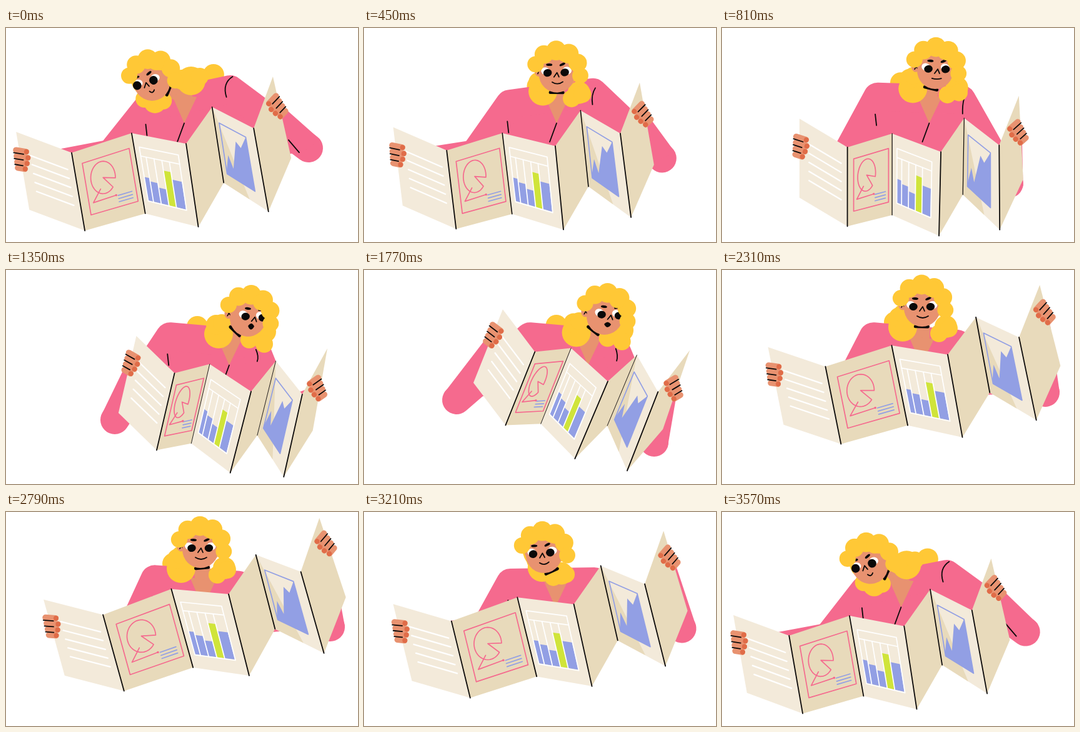
An HTML page with a canvas for the animation above (3.6 s loop, 563 by 344 pixels).

```html
<!DOCTYPE html>
<html lang="en">
<head>
<meta charset="utf-8">
<title>Reading a folded report</title>
<style>
html, body { margin: 0; width: 563px; height: 344px; overflow: hidden; background: #fff; }
canvas { display: block; }
</style>
</head>
<body>
<canvas id="stage" width="563" height="344"></canvas>
<script>
const ctx = document.getElementById('stage').getContext('2d');
const LOOP = 3600, TAU = Math.PI * 2;
const PINK = '#f56a8e', SKIN = '#e89270', NAIL = '#e06c48', HAIR = '#ffc836', INK = '#0b0909',
  LIGHT = '#f3eada', DARK = '#e8dabb', BLUE = '#929fe4', GREEN = '#d0e43a', WHITE = '#fff';

// map x, y, tilt, openness | chest x, lean | left elbow, right elbow | face x, y, turn
const poses = [
  [288,186,-9.6,.82, 293,-12, 168,202, 484,193, 233,87,-1],
  [350,199,0,.34, 316,2, 198,205, 459,250, 341,68,.3],
  [392,195,13,0, 329,5, 174,241, 440,230, 387,77,1],
  [390,179,21.7,0, 332,5, 148,209, 464,277, 385,74,.9],
  [361,136,-11.3,1, 309,5, 205,180, 517,197, 320,61,0],
  [356,132,-15.4,1.1, 305,4, 203,185, 519,185, 311,60,0]];

// time, pose progress, head progress where the head leads
const keys = [[0,0], [540,.37,.8], [810,1], [1080,1.8], [1350,2], [1620,2.95], [1770,3],
  [2160,3.82], [2310,4], [2700,4.97], [2790,5], [3240,5.33], [3570,5.95]];

// panel width and rise when closed, and what opening adds
const panels = [[73,44.5,11,4], [51.5,-27,59,14.5], [74.4,28,10.6,4],
  [27.5,-56.5,28.5,6.5], [53.3,42.6,8,2.5], [22.5,-81,26.5,5]];
const foldLength = [127, 127, 131, 135, 123, 136, 134];
const foldSlip = [0, 0, 0, -3, -2, 1, 7];

// lock radius and its place when the face looks left, ahead and right
const locks = [
  [17, [99,-12], [-44,23], [-81,14]],
  [23, [63,-2], [-31,31], [-47,26]],
  [16, [48,-4], [-37,15], [-51,11]],
  [14, [77,-9], [-32,9], [-42,8]],
  [18, [5,32], [38,30], [27,22]],
  [14, [-12,27], [27,41], [2,35]],
  [14, [18,30], [43,33], [26,42]]];

const clamp = (v, lo, hi) => Math.min(hi, Math.max(lo, v));
const lerp = (p, q, s) => p.map((v, i) => v + (q[i] - v) * s);
const add = ([x, y], dx, dy) => [x + dx, y + dy];
const polar = (r, degrees) => [r * Math.cos(degrees * TAU / 360), r * Math.sin(degrees * TAU / 360)];

// Smooth monotone curve through the keys; column 2 is the head
function progress(t, column) {
  const n = keys.length;
  const key = i => {
    const turn = Math.floor(i / n), k = keys[i - turn * n];
    return [k[0] + turn * LOOP, (k[column] ?? k[1]) + turn * 6];
  };
  let i = n - 1;
  while (keys[i][0] > t) i--;
  const [a, b, c, d] = [i - 1, i, i + 1, i + 2].map(key);
  const rate = (p, q) => (q[1] - p[1]) / (q[0] - p[0]);
  const slope = (p, q) => 2 * p * q / (p + q);
  const h = c[0] - b[0], s = (t - b[0]) / h, mid = rate(b, c);
  const m0 = slope(rate(a, b), mid) * h, m1 = slope(mid, rate(c, d)) * h;
  return b[1] + (c[1] - b[1]) * s * s * (3 - 2 * s) + s * (1 - s) * ((1 - s) * m0 - s * m1);
}
function poseAt(p) {
  const i = Math.floor(p);
  return lerp(poses[i % 6], poses[(i + 1) % 6], p - i);
}

function trace(points) {
  ctx.beginPath();
  points.forEach(p => ctx.lineTo(...p));
}
function fill(points, color) {
  trace(points);
  ctx.fillStyle = color;
  ctx.fill();
}
function line(points, color = INK, width = 1.8, closed = false) {
  trace(points);
  if (closed) ctx.closePath();
  ctx.strokeStyle = color;
  ctx.lineWidth = width;
  ctx.stroke();
}
function oval(x, y, rx, ry, color, angle = 0) {
  ctx.beginPath();
  ctx.ellipse(x, y, rx, ry, angle, 0, TAU);
  ctx.fillStyle = color;
  ctx.fill();
}
const ball = ([x, y], r, color) => oval(x, y, r, r, color);

function place([x, y], degrees, flip, draw) {
  ctx.save();
  ctx.translate(x, y);
  ctx.rotate(degrees * TAU / 360);
  ctx.scale(flip, 1);
  draw();
  ctx.restore();
}

// Fold ends and hand spots: a zigzag hung from its fourth fold, then turned
function layoutMap(x, y, tilt, open) {
  const zigzag = [[0, 0]];
  panels.forEach(([w, h, dw, dh], i) => zigzag.push(add(zigzag[i], w + dw * open, h + dh * open)));
  const ux = polar(1, tilt), uy = polar(1, tilt + 90), [ox, oy] = zigzag[3];
  const turn = ([px, py]) => [0, 1].map(k => [x, y][k] + (px - ox) * ux[k] + (py - oy) * uy[k]);
  return {
    tilt, open,
    top: zigzag.map(turn),
    bottom: zigzag.map((p, i) => turn(add(p, foldSlip[i], foldLength[i]))),
    handL: turn([0, 45]),
    handR: turn(add(zigzag[6], 0, 66 - 21 * open))
  };
}

function sleeve(elbow, hand) {
  const dx = hand[0] - elbow[0], dy = hand[1] - elbow[1], len = Math.hypot(dx, dy);
  const side = (p, r) => add(p, -dy / len * r, dx / len * r);
  fill([side(elbow, 23), side(hand, 5), side(hand, -5), side(elbow, -23)], PINK);
}

function drawBody(map, elbowL, elbowR, shoulderL, shoulderR, turn) {
  const waist = i => lerp(map.top[i], map.bottom[i], .5);
  fill([elbowL, shoulderL, shoulderR, elbowR, waist(3), waist(2)], PINK);
  line([elbowL, shoulderL, shoulderR, elbowR], PINK, 46);
  sleeve(elbowL, map.handL);
  sleeve(elbowR, map.handR);
  line([add(elbowR, -32, -13), add(elbowR, -15, 7)]);
  line([add(shoulderL, -4, 28), add(shoulderL, -2, 46)]);
  ctx.beginPath();
  ctx.moveTo(...add(shoulderR, 4, -6 + 15 * turn));
  ctx.quadraticCurveTo(...add(shoulderR, -2 + 11 * turn, 5 + 15 * turn), ...add(shoulderR, 6 * turn, 20 + 8 * turn));
  ctx.stroke();
}

function drawFace(turn) {
  const left = Math.max(0, -turn), right = Math.max(0, turn);
  [[-31 + 26 * left, 1], [31 - 26 * right, -1]].forEach(([x, flip]) => place([x, -5], 0, flip, () => {
    oval(0, 0, 7, 8.5, SKIN);
    line([[-3, -4], [3, 3]], INK, 1.6);
    line([[0, 0], [-2, 4]], INK, 1.6);
  }));
  oval(0, 0, 29, 30, SKIN);

  ctx.translate(10 * turn, -2);
  const glance = [-4 + 7 * left, 4 - 8 * Math.min(1, 2 * right)];
  [-14, 13.5].forEach((x, i) => {
    oval(x + glance[i], -3, 7, 6, WHITE, .3);
    oval(x, 0, 6.8, 6 + left, INK, -.2);
  });
  oval(-11, -13, 5, 2, INK, .05);
  oval(10, -13, 5, 2, INK, -.4);
  line([[-4, 7], [1, 0], [4, 7]]);

  const mx = 1 - 5 * turn, my = 15, w = 9 - 5 * Math.abs(turn);
  const curve = clamp(6 - 13 * turn, 1, 6), open = 13 * Math.max(0, turn - .4);
  ctx.beginPath();
  ctx.moveTo(mx - w, my);
  ctx.quadraticCurveTo(mx, my + curve - open, mx + w, my);
  ctx.quadraticCurveTo(mx, my + curve + open, mx - w, my);
  ctx.fillStyle = INK;
  if (open > 0) ctx.fill();
  ctx.stroke();
}

function drawCurls(face, turn) {
  for (let i = 0; i < 6; i++)
    ball(add(face, ...polar(37.5, -155 + 32 * i + 9 * turn)), 12.5 + 3.5 * Math.sin((i + .3) / 5.5 * Math.PI), HAIR);
  ball(add(face, 14 + 7 * turn, -32 + 7 * Math.max(0, turn)), 13, HAIR);
}

function drawPerson(map, body, look) {
  const [, , , , chestX, lean, lx, ly, rx, ry] = body, [fx, fy, turn] = look.slice(10);
  const face = [fx, fy], span = polar(67, lean);
  const shoulderL = [chestX - span[0], 113 - span[1]], shoulderR = [chestX + span[0], 113 + span[1]];
  const nape = [chestX + 10 + 18 * turn, 108];
  const drawLock = ([r, left, front, right]) =>
    ball(add(face, ...lerp(front, turn < 0 ? left : right, Math.abs(turn))), r, HAIR);

  drawLock(locks[0]);
  drawBody(map, [lx, ly], [rx, ry], shoulderL, shoulderR, turn);
  ball(add(face, 0, -8), 34, HAIR);
  line([face, nape], SKIN, 26);
  const collar = add(nape, 0, 45);
  fill([add(nape, -21, -3), add(nape, 20, 3), collar], SKIN);
  line([collar, add(collar, -11, 30)]);
  locks.slice(1).forEach(drawLock);
  const aim = Math.atan2(nape[1] - fy, nape[0] - fx) * 360 / TAU, throat = add(face, ...polar(30, aim));
  line([add(throat, ...polar(10, aim - 90)), add(throat, ...polar(10, aim + 90))], INK, 5);
  place(face, turn * (turn < 0 ? 18 : 4), 1, () => drawFace(turn));
  drawCurls(face, turn);
}

function drawMap({ top, bottom, open }) {
  const on = panel => (u, v) =>
    lerp(lerp(top[panel], top[panel + 1], u), lerp(bottom[panel], bottom[panel + 1], u), v);
  const box = (at, u0, v0, u1, v1) => [at(u0, v0), at(u1, v0), at(u1, v1), at(u0, v1)];

  for (let i = 0; i < 6; i++) fill(box(on(i), 0, 0, 1, 1), i % 2 ? DARK : LIGHT);

  const text = on(0);
  for (let i = 0; i < 5; i++) {
    const v = .25 + i * .115;
    line([text(.2, v), text(.87, v)], WHITE, 2.3);
  }

  const pie = on(1), ring = [pie(.43, .42)];
  for (let i = 0; i <= 40; i++) {
    const a = .85 + i / 40 * (TAU - .6);
    ring.push(pie(.43 + .2 * Math.cos(a), .42 + .2 * Math.sin(a)));
  }
  line(box(pie, .14, .17, .92, .83), PINK, 1.7, true);
  line(ring, PINK, 1.7, true);
  line([pie(.36, .55), pie(.21, .69), pie(.59, .68)], PINK, 1.7);
  ball(pie(.59, .68), 1.8, PINK);
  [.69, .73, .77].forEach(v => line([pie(.62, v), pie(.85, v)], BLUE, 1.7));

  const chart = on(2), edges = [.1, .2, .345, .49, .63, .81];
  [.53, .57, .625, .395, .485].forEach((v, i) =>
    fill(box(chart, edges[i], v, edges[i + 1], .82), i === 3 ? GREEN : BLUE));
  edges.slice(1, 5).forEach(u => line([chart(u, .27), chart(u, .83)], WHITE, 1.7));
  line([chart(.1, .27), chart(.82, .27)], WHITE, 1.7);
  line(box(chart, .1, .16, .82, .83), WHITE, 1.7, true);

  const area = on(4);
  fill([area(0, 0), area(0, 1), area(.58, 1)], DARK);
  fill([[.12, .84], [.12, .8], [.22, .56], [.3, .71], [.47, .31], [.575, .36], [.75, .175], [.75, .84]]
    .map(p => area(...p)), BLUE);
  line(box(area, .12, .175, .75, .84), BLUE, 1.7, true);

  for (let i = 1; i < 6; i++)
    line([top[i], bottom[i]], INK, i % 2 ? 1.8 : clamp(.9 + open, .9, 1.8));
}

function drawHand() {
  [11, 15, 15, 13.5].forEach((tip, i) => {
    const y = (i - 1.5) * 9.2;
    line([[-10 + 2.5 * i, y], [tip - 4.7, y]], SKIN, 9.6);
    ball([tip - 4, y], 4, NAIL);
  });
  for (let i = 0; i < 3; i++) {
    const y = (i - 1) * 9.2;
    line([[-13 + 2.5 * i, y], [3 + i, y]]);
  }
}

function render(t) {
  ctx.fillStyle = WHITE;
  ctx.fillRect(0, 0, 563, 344);
  ctx.lineCap = ctx.lineJoin = 'round';
  const body = poseAt(progress(t, 1)), look = poseAt(progress(t, 2));
  const [x, y, tilt, open] = body;
  const dip = 11 * Math.exp(-(((t - 1090) / 130) ** 2));
  const map = layoutMap(x, y + dip, tilt, open);
  drawPerson(map, body, look);
  drawMap(map);
  place(map.handL, 18 + .9 * tilt, 1, drawHand);
  place(map.handR, -42 + .5 * tilt, -1, drawHand);
}

const start = performance.now();
function tick() {
  render((performance.now() - start) % LOOP);
  requestAnimationFrame(tick);
}
tick();
</script>
</body>
</html>
```
